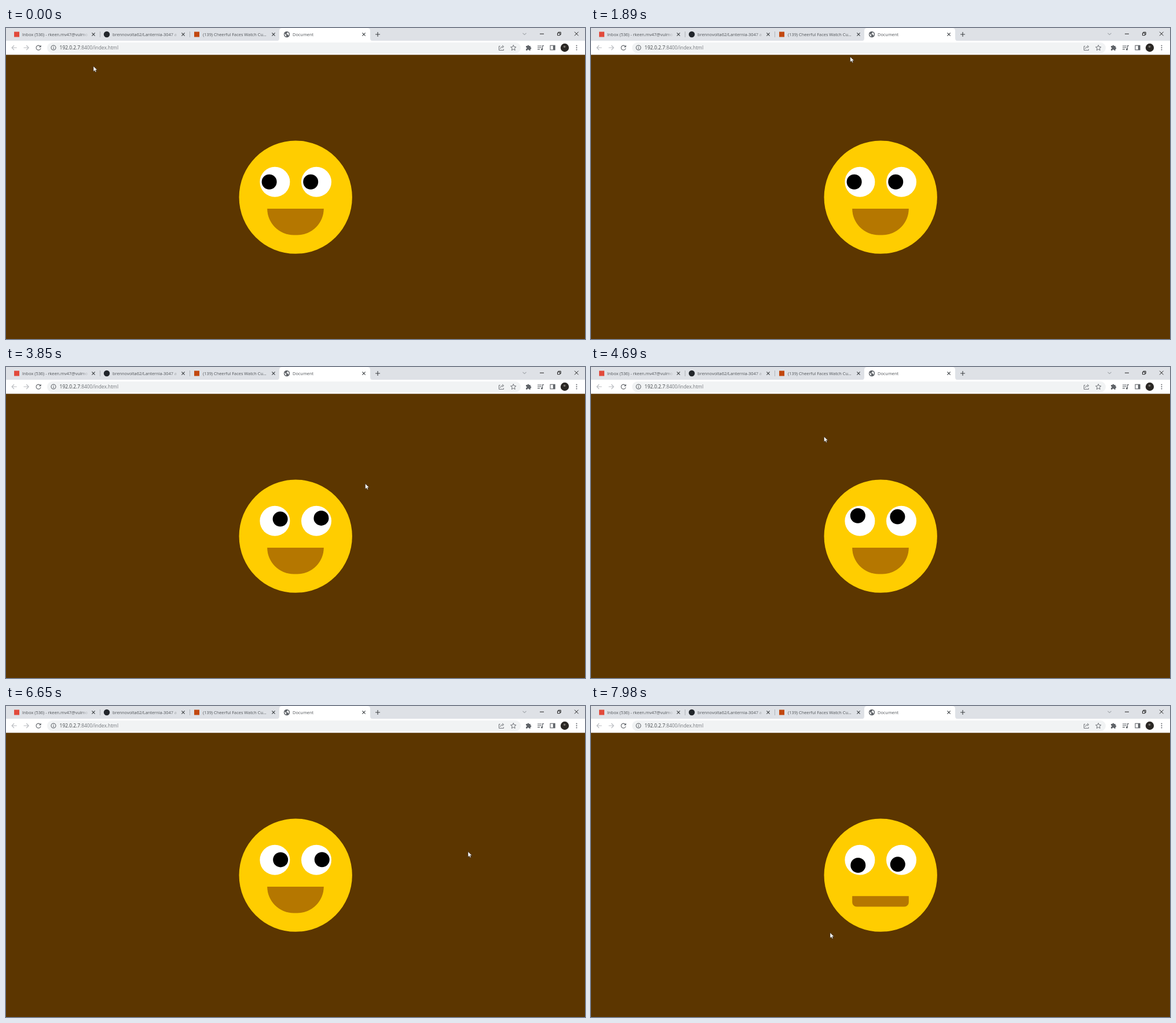
Animation, 1000 px wide and 537 px high, one loop 8000 ms. Source, as an HTML page:

```html
<!DOCTYPE html>
<html lang="en">
<head>
<meta charset="utf-8">
<title>Document</title>
<style>
  html, body { margin: 0; width: 100%; height: 100%; overflow: hidden; background: #5c3600; }
  svg { display: block; width: 100%; height: 100%; }
  text { font-family: "Open Sans", "Noto Sans", sans-serif; font-size: 7.4px; fill: #505458; }
  .url { font-size: 8.4px; fill: #73777c; }
  .url .host { fill: #3c4043; }
  .line { fill: none; stroke: #5f6368; stroke-width: 1.1; }
  .dark { stroke: #3c4043; }
  .pale { stroke: #b9bcc0; }
  .solid { fill: #5f6368; }
</style>
</head>
<body>
<svg viewBox="0 0 1000 537" preserveAspectRatio="none">
  <defs>
    <linearGradient id="fade">
      <stop offset="0" stop-color="#dee1e6" stop-opacity="0"/>
      <stop offset="1" stop-color="#dee1e6"/>
    </linearGradient>
    <path id="cross" class="line dark" d="M-2.6-2.6 2.6 2.6M2.6-2.6-2.6 2.6"/>
  </defs>

  <!-- Tab strip -->
  <rect width="1000" height="23" fill="#dee1e6"/>
  <path d="M467 22.5Q472 22.5 472 17.5V5Q472 0 477 0H624Q629 0 629 5V17.5Q629 22.5 634 22.5Z" fill="#fff"/>
  <path d="M162.5 6V16M317.5 6V16" stroke="#a5a9ae" stroke-width=".8"/>

  <rect x="14" y="6.5" width="9" height="9" fill="#e24a3b"/>
  <text x="28" y="13.7">Inbox (536) - rkeen.mv47@vulmo.c</text>
  <circle cx="174" cy="11" r="5.2" fill="#22262b"/>
  <text x="184" y="13.7">brennovolta62/Lanternia-3047 a</text>
  <rect x="325" y="6.5" width="9" height="9" fill="#c2480f"/>
  <text x="340" y="13.7">(139) Cheerful Faces Watch Cu...</text>
  <rect x="130" y="3" width="13" height="16" fill="url(#fade)"/>
  <rect x="143" y="3" width="4" height="16" fill="#dee1e6"/>
  <rect x="285" y="3" width="13" height="16" fill="url(#fade)"/>
  <rect x="298" y="3" width="4" height="16" fill="#dee1e6"/>
  <rect x="453" y="3" width="5" height="16" fill="#dee1e6"/>

  <circle cx="485" cy="11" r="5.2" class="solid"/>
  <path d="M481 9.6 484 12.2V14.8Q481 13.6 481 9.6M486 7.2 485.4 9.4 483.4 10.2 486.8 11.2 488 13.4Q490.2 9 486 7.2" fill="#fff"/>
  <text x="495" y="13.7">Document</text>
  <use href="#cross" x="151" y="11"/>
  <use href="#cross" x="306" y="11"/>
  <use href="#cross" x="462" y="11"/>
  <use href="#cross" x="618" y="11"/>
  <path class="line dark" d="M638 11H646M642 7V15"/>

  <!-- Window buttons -->
  <path class="line" style="stroke:#a0a4aa" d="M892.5 8.8 895.5 11.6 898.5 8.8"/>
  <path class="line" style="stroke:#222;stroke-width:1" d="M922 10.2H929M952.5 8.8H956.8V12.7H952.5ZM953.8 8.6V7.2H958.2V11.4H957M982 6.7 988.6 13.3M988.6 6.7 982 13.3"/>

  <!-- Toolbar -->
  <rect y="22" width="1000" height="24" fill="#fff"/>
  <rect x="71" y="25" width="818" height="18.4" rx="9.2" fill="#f1f3f4"/>
  <path class="line pale" d="M18.7 34H10M14 30 10 34 14 38M30.5 34H39.2M35.2 30 39.2 34 35.2 38"/>
  <path class="line" d="M59.2 31.6A4 4 0 1 0 60 35"/>
  <path class="solid" d="M60.6 29.5V33.3H56.8Z"/>
  <circle class="line" cx="82" cy="34" r="4"/>
  <path class="line" d="M82 33.4V36.4M82 31.4V32.5"/>
  <text class="url" x="92.6" y="37"><tspan class="host">192.0.2.7</tspan>:8400/index.html</text>

  <path class="line" style="stroke-width:.9" d="M853.5 31.4H851.5V38.4H859.4V36.4M853.8 36Q854 32.4 858 32.2M857 30 859.8 32.2 857 34.4"/>
  <path class="line" style="stroke-width:.9" d="M876.3 29.4 877.6 32.6 881 32.9 878.4 35.1 879.2 38.5 876.3 36.7 873.4 38.5 874.2 35.1 871.6 32.9 875 32.6Z"/>
  <path class="solid" d="M898 31H900.4A1.5 1.5 0 0 1 903.4 31H905.8V33.3A1.5 1.5 0 0 1 905.8 36.3V38.8H903.4A1.5 1.5 0 0 0 900.4 38.8H898V36.3A1.5 1.5 0 0 0 898 33.3Z"/>
  <path class="line" d="M918 31H925M918 33.8H925M918 36.6H922M926.6 36.8V30.6H929"/>
  <circle class="solid" cx="925.5" cy="36.9" r="1.6"/>
  <rect class="line" x="940" y="30.2" width="8" height="7.6"/>
  <rect class="solid" x="944.8" y="30" width="3.4" height="8"/>
  <circle cx="965" cy="34" r="7.2" fill="#2a2724"/>
  <circle cx="964.6" cy="32.2" r="1.8" fill="#77736d"/>
  <g class="solid"><circle cx="985.5" cy="30.6" r="1"/><circle cx="985.5" cy="34" r="1"/><circle cx="985.5" cy="37.4" r="1"/></g>

  <!-- Page -->
  <rect y="45.8" width="1000" height="1.2" fill="#dadce0"/>
  <rect y="46.35" width="1000" height="491" fill="#5c3600"/>
  <circle cx="500.2" cy="292.2" r="97.66" fill="#ffcd00"/>
  <circle cx="464.4" cy="265.8" r="26" fill="#fff"/>
  <circle cx="536" cy="265.8" r="26" fill="#fff"/>
  <circle class="pupil" r="13"/>
  <circle class="pupil" r="13"/>
  <path id="mouth" fill="#b57700"/>
  <path id="cursor" d="M0 0V9.2L2.1 7.2 3.5 10.2 5 9.5 3.7 6.6H6.6Z" fill="#fff" stroke="#222" stroke-width=".5"/>
</svg>
<script>
const LOOP = 8000, STEP = 70;
const FOLLOW_FROM = 2800;              // pupils rest to the left until then
const ENTER = 7210, LEAVE = 7910;      // pointer over the face
const FADE = 500;
const EYE_R = 26, PUPIL_OFFSET = 9.77;
const eyes = [[464.4, 265.8], [536, 265.8]];
const pupils = document.querySelectorAll('.pupil');
const mouth = document.getElementById('mouth');
const cursor = document.getElementById('cursor');

// Pointer path: time, x, y
const path = [
  [0, 151, 66], [1120, 222.5, 31], [2660, 656, 89], [3850, 620.5, 201.5],
  [4700, 400, 120], [5600, 182.5, 176.5], [5880, 250, 400], [6250, 530, 470],
  [6650, 798, 251.5], [7210, 590, 255], [7500, 537, 272], [7840, 449, 345],
  [7910, 431, 366], [7980, 413, 391.5]
];

function slope(i, k) {
  const a = path[i - 1], b = path[i + 1];
  return a && b ? (b[k] - a[k]) / (b[0] - a[0]) : 0;
}

function pointer(t) {
  let i = 0;
  while (i < path.length - 2 && t >= path[i + 1][0]) i++;
  const a = path[i], b = path[i + 1], d = b[0] - a[0], u = (t - a[0]) / d, v = 1 - u;
  return [1, 2].map(k =>
    v * v * (1 + 2 * u) * a[k] + u * u * (3 - 2 * u) * b[k] +
    d * u * v * (v * slope(i, k) - u * slope(i + 1, k)));
}

// The eye aims from a point shifted up and left, as its rotated bounding box grows
function aim(dx, dy) {
  let angle = Math.atan2(dy, dx);
  for (let n = 0; n < 4; n++) {
    const shift = EYE_R * (Math.abs(Math.cos(angle)) + Math.abs(Math.sin(angle)) - 1);
    angle = Math.atan2(dy + shift, dx + shift);
  }
  return angle;
}

// Same curve as the CSS "ease" keyword
function ease(x) {
  if (x <= 0) return 0;
  if (x >= 1) return 1;
  const bez = (s, p, q) => 3 * s * (1 - s) ** 2 * p + 3 * s * s * (1 - s) * q + s ** 3;
  let lo = 0, hi = 1;
  for (let n = 0; n < 20; n++) {
    const mid = (lo + hi) / 2;
    if (bez(mid, .25, .25) < x) lo = mid; else hi = mid;
  }
  return bez(lo, .1, 1);
}

function drawMouth(closed) {
  const top = 311.9 + 19.5 * closed, bottom = top + 45.5 - 32.5 * closed;
  const r = 45.5 * (1 - closed), left = 451.2, right = 548.8;
  mouth.setAttribute('d', `M${left} ${top}H${right}V${bottom - r}` +
    `A${r} ${r} 0 0 1 ${right - r} ${bottom}H${left + r}` +
    `A${r} ${r} 0 0 1 ${left} ${bottom - r}Z`);
}

function draw(now) {
  const t = Math.floor((now % LOOP) / STEP) * STEP;
  const [x, y] = pointer(t);
  cursor.setAttribute('transform', `translate(${x} ${y})`);
  eyes.forEach(([ex, ey], i) => {
    const a = t < FOLLOW_FROM ? Math.PI : aim(x - ex, y - ey);
    pupils[i].setAttribute('cx', ex + PUPIL_OFFSET * Math.cos(a));
    pupils[i].setAttribute('cy', ey + PUPIL_OFFSET * Math.sin(a));
  });
  drawMouth(ease((t - ENTER) / FADE) - ease((t - LEAVE) / FADE));
  requestAnimationFrame(() => draw(performance.now() - start));
}

const start = performance.now();
draw(0);
</script>
</body>
</html>
```
